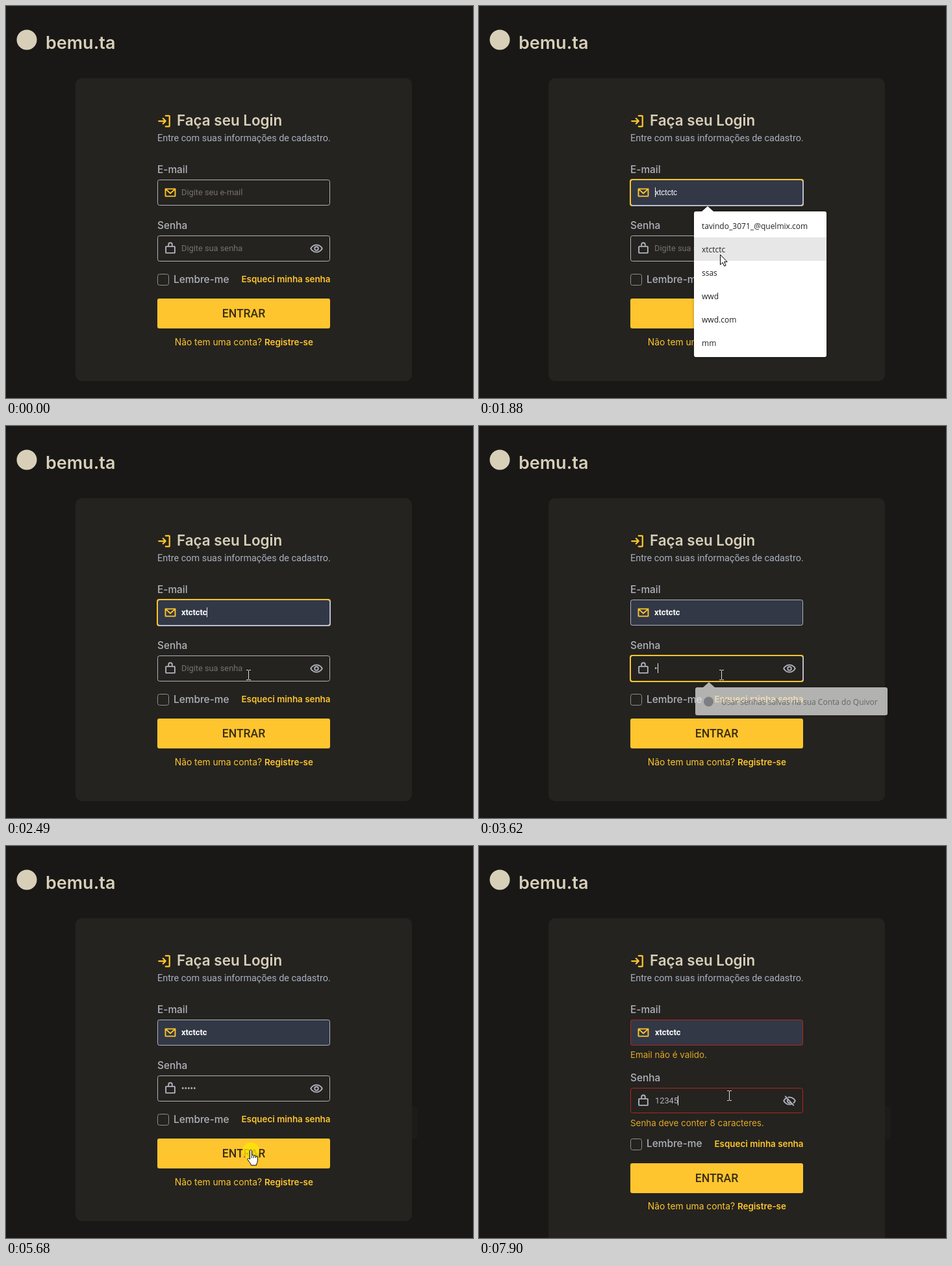
These frames come from a looping animation (719 by 603 pixels, 8000 ms). An HTML page with a canvas:

```html
<!DOCTYPE html>
<html lang="pt-BR">
<head>
<meta charset="utf-8">
<title>Login</title>
<style>
html, body { margin: 0; width: 100%; height: 100%; overflow: hidden; background: #191816; }
canvas { display: block; }
</style>
</head>
<body>
<canvas id="stage" width="719" height="603"></canvas>
<script>
const ctx = document.getElementById('stage').getContext('2d');
const LOOP = 8000;
const UI = 'Inter, sans-serif', BODY = 'Roboto, sans-serif', MENU = '"Open Sans", "Noto Sans", sans-serif';
const C = {
  bg: '#191816', card: '#24231f', cream: '#d8cfb9', gray: '#b0b3bd', soft: '#a7b0c0',
  hint: '#77706e', yellow: '#ffc52f', warn: '#e2a927', red: '#b3241f', fill: '#323846'
};
const USER = 'xtctctc';
const OPTIONS = ['tavindo_3071_@quelmix.com', USER, 'ssas', 'wwd', 'wwd.com', 'mm'];

// Moments of the story, in ms
const T = { open: 860, row1: 1390, row2: 1460, pick: 2350, pass: 2820, type: 3550,
  gone: 3890, press: 5620, blur: 5680, release: 5810, error: 5880, leave: 6960, reveal: 7290 };

// time, shape, x, y
const MOVES = [
  [0, '', 0, 0], [390, 'beam', 456, 387], [460, 'beam', 327, 301],
  [1320, 'arrow', 338, 318], [1390, 'arrow', 350, 336], [1460, 'arrow', 364, 366], [1530, 'arrow', 371, 382],
  [2420, 'beam', 373, 383], [5090, 'arrow', 377, 412], [5160, 'arrow', 380, 436],
  [5360, 'arrow', 380, 443], [5430, 'hand', 378, 458], [5500, 'hand', 377, 467],
  [6560, 'arrow', 412, 442], [6620, 'arrow', 466, 404], [6690, 'arrow', 504, 383],
  [6890, 'beam', 498, 382], [6960, 'beam', 488, 385], [7020, 'hand', 478, 386],
  [7430, 'beam', 448, 394], [7500, 'beam', 410, 387], [7570, 'beam', 385, 384]
];
const TYPED = [3550, 3690, 3890, 4420, 4490];

// Drawn on a 256 unit grid
const ICON = {
  login: 'M94 170l42-42-42-42M24 128h112M136 40h56a8 8 0 0 1 8 8v160a8 8 0 0 1-8 8h-56',
  mail: 'M32 56h192v136a8 8 0 0 1-8 8H40a8 8 0 0 1-8-8zM224 56l-96 88L32 56',
  lock: 'M48 88h160a8 8 0 0 1 8 8v112a8 8 0 0 1-8 8H48a8 8 0 0 1-8-8V96a8 8 0 0 1 8-8zM92 88V52a36 36 0 0 1 72 0v36',
  eye: 'M128 56C48 56 16 128 16 128s32 72 112 72 112-72 112-72-32-72-112-72zM164 128a36 36 0 1 1-72 0 36 36 0 0 1 72 0z',
  eyeOff: 'M48 40l160 176M155 158a40 40 0 0 1-54-60M74 68C33 88 16 128 16 128s32 72 112 72a126 126 0 0 0 54-12M209 169c21-19 31-41 31-41s-32-72-112-72a126 126 0 0 0-21 2'
};
for (const k in ICON) ICON[k] = new Path2D(ICON[k]);
const ARROW = new Path2D('M.5.5v15.5l3.6-3.4 2.6 5.6 2.4-1.1-2.5-5.5h4.6z');
const HAND = new Path2D('M6 2c0-2 3-2 3 0v7c1-1 3-.8 3 .8 1-1 3-.6 3 1 1-.8 2.8-.4 2.8 1.3v5c0 3-1.5 4-2 7H8c-.5-2.5-3-5-5-8-1.5-2.2.8-3.6 2.2-2L6 15z');

const between = (t, a, b) => t >= a && t < b;

function text(s, x, y, font, color, align = 'left') {
  ctx.font = font;
  ctx.fillStyle = color;
  ctx.textAlign = align;
  ctx.fillText(s, x, y);
}

function box(x, y, w, h, r, color, border) {
  ctx.beginPath();
  ctx.roundRect(x, y, w, h, r);
  ctx.fillStyle = color;
  ctx.fill();
  if (!border) return;
  ctx.beginPath();
  ctx.roundRect(x + .5, y + .5, w - 1, h - 1, r);
  ctx.lineWidth = 1;
  ctx.strokeStyle = border;
  ctx.stroke();
}

function circle(x, y, r, color) {
  ctx.beginPath();
  ctx.arc(x, y, r, 0, 7);
  ctx.fillStyle = color;
  ctx.fill();
}

function icon(name, cx, cy, size, color) {
  ctx.save();
  ctx.translate(cx - size / 2, cy - size / 2);
  ctx.scale(size / 256, size / 256);
  ctx.lineWidth = 24;
  ctx.lineCap = ctx.lineJoin = 'round';
  ctx.strokeStyle = color;
  ctx.stroke(ICON[name]);
  ctx.restore();
}

function field(y, h, fill, border) {
  box(233, y, 266, h, 3, fill, border);
}

function focusRing(y, bottom) {
  ctx.beginPath();
  ctx.roundRect(233, y, 266, 40, 3);
  ctx.lineWidth = 2;
  ctx.strokeStyle = C.yellow;
  ctx.stroke();
  ctx.fillStyle = '#b9bccb';
  ctx.fillRect(498, y + 2, 2, 37);
  if (!bottom) ctx.fillRect(235, y + 39, 263, 2);
}

function caret(x, y) {
  ctx.fillStyle = '#e8e8ea';
  ctx.fillRect(Math.round(x), y, 1, 15);
}

function bubble(x, y, w, h, tip) {
  ctx.save();
  ctx.shadowColor = 'rgba(0,0,0,.3)';
  ctx.shadowBlur = 5;
  ctx.fillStyle = '#fff';
  ctx.beginPath();
  ctx.roundRect(x, y, w, h, 3);
  ctx.moveTo(tip - 9, y);
  ctx.lineTo(tip, y - 8);
  ctx.lineTo(tip + 9, y);
  ctx.fill();
  ctx.restore();
}

function header() {
  circle(32, 52, 15.5, C.cream);
  text('bemu.ta', 61, 66, '600 27px ' + UI, C.cream);
  icon('login', 245, 177, 24, C.yellow);
  text('Faça seu Login', 263, 184, '600 22.4px ' + UI, C.cream);
  text('Entre com suas informações de cadastro.', 233, 208, '14.4px ' + BODY, C.soft);
}

function emailField(t, bad) {
  const hover = t >= T.row2 ? 2 : t >= T.row1 ? 1 : 0;
  const focus = between(t, T.open, T.pass);
  text('E-mail', 233, 257, '500 15.4px ' + UI, C.gray);
  field(267, 40, hover ? C.fill : C.card, bad ? C.red : C.gray);
  if (focus) focusRing(267);
  icon('mail', 253, 287, 20, C.yellow);
  if (!hover) text('Digite seu e-mail', 270, 291, '12.8px ' + BODY, C.hint);
  else if (t < T.pick) text(OPTIONS[hover - 1], 271, 291, '12px "Liberation Sans", sans-serif', '#fff');
  else text(USER, bad ? 271 : 270, 291, '700 12.8px ' + BODY, '#fff');
  if (between(t, T.open, 1360) || between(t, 1880, 2280)) caret(271, 279);
  if (between(t, T.pick, T.pass)) caret(309, 279);
  if (bad) text('Email não é valido.', 233, 326, '13.4px ' + UI, C.warn);
}

function passField(t, bad) {
  const dy = bad ? 19 : 0, x = bad ? 271 : 270;
  const dots = TYPED.filter(m => t >= m).length;
  const shown = t >= T.reveal;
  text('Senha', 233, 343 + dy, '500 15.4px ' + UI, C.gray);
  field(353 + dy, bad ? 39 : 40, C.card, bad ? C.red : C.gray);
  if (between(t, T.pass, T.blur)) focusRing(353, true);
  icon('lock', 253, 373 + dy, 20, C.gray);
  icon(shown ? 'eyeOff' : 'eye', 478, 373 + dy, 20, C.gray);
  if (shown) text('12345', x, 377 + dy, '12.8px ' + BODY, C.gray);
  else if (dots) text('•'.repeat(dots), x, 377 + dy, '500 12.8px ' + BODY, C.gray);
  else text('Digite sua senha', 270, 377, '12.8px ' + BODY, C.hint);
  if (between(t, T.pass, 3350) || between(t, T.type, 5020) || between(t, 5520, T.blur))
    caret(271 + 4.4 * dots, 365);
  if (t >= 7900) caret(306, 384);
  if (bad) text('Senha deve conter 8 caracteres.', 233, 431, '13.4px ' + UI, C.warn);
}

function footer(bad) {
  const dy = bad ? 38 : 0, ty = bad ? 37 : 0;
  box(233, 412 + dy, 18, 18, 3, C.card, '#918f8b');
  text('Lembre-me', 258, 426 + ty, '500 15.4px ' + UI, C.gray);
  text('Esqueci minha senha', 499.5, 425 + dy, '600 13.4px ' + UI, C.yellow, 'right');
  box(233, 450 + dy, 266, 46, 3, C.yellow);
  text('ENTRAR', 366, 479 + dy, '500 17.6px ' + BODY, '#3a2d10', 'center');
  text('Não tem uma conta?', 394, 522 + ty, '13.8px ' + UI, C.yellow, 'right');
  text('Registre-se', 398, 522 + ty, '600 13.4px ' + UI, C.yellow);
}

function emailMenu(t) {
  bubble(331, 316, 204, 224, 352);
  const row = t >= T.row2 ? 1 : t >= T.row1 ? 0 : -1;
  ctx.fillStyle = '#e7e7e7';
  if (row >= 0) ctx.fillRect(331, 320 + row * 36, 204, 36);
  OPTIONS.forEach((s, i) => text(s, 343, 343 + i * 36, '12px ' + MENU, '#202124'));
}

function passMenu(t) {
  const step = T.type + Math.floor((t - T.type) / 70) * 70;
  ctx.save();
  ctx.globalAlpha = t < T.type ? 1 : Math.max(0, 1 - (step - 3480) / 410);
  bubble(333, 402, 296, 43, 354);
  circle(353.5, 424, 7.5, '#5f6368');
  text('Usar senhas salvas na sua Conta do Quivor', 373, 429, '12px ' + MENU, '#3c4043');
  ctx.restore();
}

function pointer(t) {
  const [, kind, x, y] = MOVES.filter(m => t >= m[0]).pop();
  ctx.save();
  ctx.translate(x, y);
  ctx.lineWidth = 1;
  ctx.lineJoin = 'round';
  ctx.strokeStyle = '#000';
  ctx.fillStyle = '#fff';
  if (kind === 'beam') {
    // the text cursor inverts what lies under it
    ctx.globalCompositeOperation = 'difference';
    ctx.fillRect(0, -7, 1, 14);
    for (const dy of [-8, 7]) {
      ctx.fillRect(-3, dy, 3, 1);
      ctx.fillRect(1, dy, 3, 1);
    }
  } else if (kind) {
    if (kind === 'hand') ctx.translate(-7.5, 0);
    const shape = kind === 'hand' ? HAND : ARROW;
    ctx.fill(shape);
    ctx.stroke(shape);
    if (kind === 'hand') {
      ctx.beginPath();
      for (const dx of [9, 12, 15]) {
        ctx.moveTo(dx, 9.5);
        ctx.lineTo(dx, 13);
      }
      ctx.stroke();
    }
  }
  ctx.restore();
}

function draw(t) {
  const bad = t >= T.error;
  ctx.fillStyle = C.bg;
  ctx.fillRect(0, 0, 719, 603);
  if (t >= T.gone) box(615, 401, 19, 50, 6, '#1d1c1a');
  box(107, 111, 518, bad ? 520 : 466, 10, C.card);
  header();
  emailField(t, bad);
  passField(t, bad);
  footer(bad);
  if (between(t, T.open, T.pick)) emailMenu(t);
  if (between(t, T.pass, T.gone)) passMenu(t);
  if (between(t, T.press, T.release)) circle(377, 469, 13, 'rgba(255,228,10,.8)');
  if (between(t, T.error, T.leave)) box(-4, 600, 236, 10, 4, '#b9bab9');
  pointer(t);
}

function tick() {
  draw(performance.now() % LOOP);
  requestAnimationFrame(tick);
}
tick();
</script>
</body>
</html>
```
